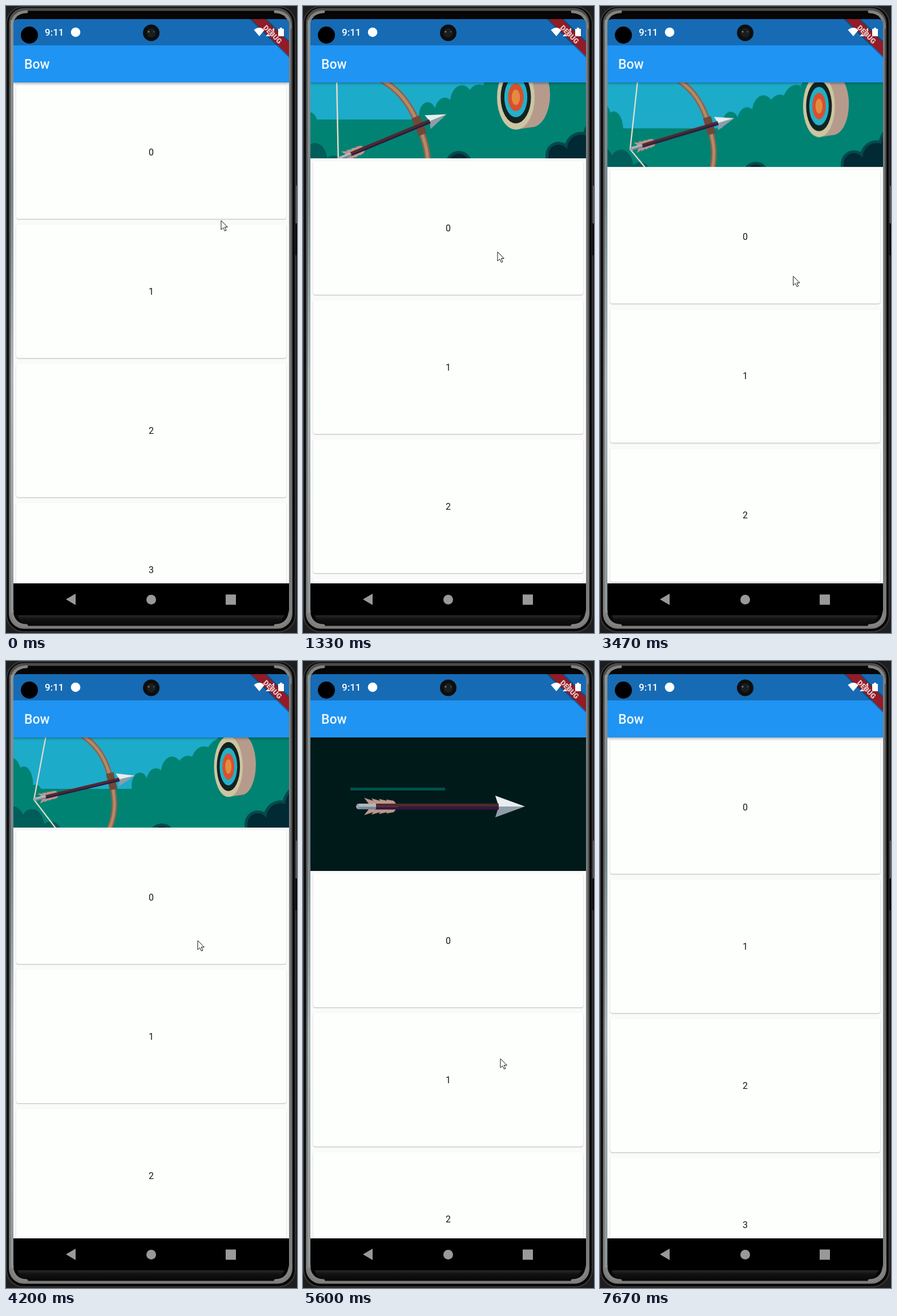
Write an HTML page with a canvas that moves like this. It is 510x1099 px and loops after 7740 ms.

```html
<!DOCTYPE html>
<html lang="en">
<head>
<meta charset="utf-8">
<title>Bow</title>
<style>
html, body { margin: 0; width: 100%; height: 100%; overflow: hidden; background: #1d1d1d; }
body { position: relative; font-family: Roboto, sans-serif; }
svg { position: absolute; left: 0; top: 0; }
#view { position: absolute; left: 13px; top: 134px; width: 483px; height: 878px; overflow: hidden; background: #f9faf9; }
#view > * { position: absolute; left: 0; top: 0; }
#list { width: 483px; height: 980px; background: #f9faf9; }
.card { position: absolute; left: 5px; width: 473px; height: 234px; border-radius: 4px; background: #fdfffd;
  box-shadow: 0 1px 2px rgba(0,0,0,.27); font-size: 16px; line-height: 235px; text-align: center; color: #161616; }
#bar { position: absolute; left: 13px; top: 69px; width: 483px; height: 65px; background: #1f94f3; box-shadow: 0 2px 4px rgba(0,0,0,.3); clip-path: inset(0 0 -8px 0); }
</style>
</head>
<body>
<svg width="510" height="1099">
  <defs>
    <linearGradient id="edge" x2="0" y2="1">
      <stop stop-color="#4c4c4c"/><stop offset=".5" stop-color="#555"/><stop offset="1" stop-color="#7c7c7c"/>
    </linearGradient>
    <linearGradient id="side" x2="0" y2="1">
      <stop stop-color="#8b9294"/><stop offset=".3" stop-color="#77868b"/><stop offset=".6" stop-color="#a9b6ba"/><stop offset="1" stop-color="#8c9395"/>
    </linearGradient>
    <linearGradient id="chin" x2="0" y2="1">
      <stop stop-color="#353535"/><stop offset=".5" stop-color="#111"/><stop offset="1" stop-color="#080808"/>
    </linearGradient>
    <clipPath id="status"><path d="M13 134V31Q13 23 21 23H488Q496 23 496 31V134Z"/></clipPath>
  </defs>
  <rect width="510" height="1099" fill="#1e1e1e"/>
  <rect x="1" y="1" width="506" height="1096" rx="30" fill="#070707" stroke="#383838" stroke-width="2"/>
  <rect x="7.500" y="6" width="492" height="1083" rx="24" fill="#060606" stroke="url(#edge)" stroke-width="5"/>
  <path d="M20 1064H490L480 1082Q478 1086 470 1086H40Q24 1086 20 1064Z" fill="url(#chin)"/>
  <path d="M10 38Q10 11 36 10M498 38Q498 11 472 10M10 1058Q11 1085 36 1086M498 1058Q497 1085 472 1086" fill="none" stroke="#83837f" stroke-width="5" stroke-linecap="round"/>
  <rect x="8" y="24" width="6" height="1040" rx="3" fill="url(#side)"/>
  <rect x="495" y="24" width="4" height="1040" rx="2" fill="#7b7d7e"/>
  <path d="M508 315h2v66h-2z" fill="#555"/>
  <path d="M507 381h3v56h-3z" fill="#080808"/>
  <path d="M13 1000H496V1058Q496 1068 486 1068H23Q13 1068 13 1058Z"/>
</svg>
<div id="view"><canvas id="scene" width="483" height="234"></canvas><div id="list"></div></div>
<div id="bar"></div>
<svg width="510" height="1099">
  <g clip-path="url(#status)">
    <path d="M13 23H496V69H13Z" fill="#166bb4"/>
    <path d="M430 23H454L496 64V88Z" fill="#921b27" stroke="#000" stroke-opacity=".3" stroke-width="4" paint-order="stroke"/>
  </g>
  <text x="32" y="110" font-size="23" font-weight="500" fill="#f1f8fe">Bow</text>
  <text x="68" y="52" font-size="17" font-weight="500" fill="#fff">9:11</text>
  <circle cx="122" cy="46" r="8.300" fill="#fff"/>
  <circle cx="41" cy="51" r="15"/>
  <circle cx="254.500" cy="47" r="14.500" fill="#0c0e0f"/>
  <circle cx="254.500" cy="47" r="8" fill="#1b1e1f"/>
  <circle cx="250" cy="45" r="1.600" fill="#777"/><circle cx="259" cy="45" r="1.200" fill="#555"/>
  <path d="M434.500 42Q444 34 453 42L444 53ZM455 53L470 38V53ZM477 40h3v-2h4v2h3v13h-10z" fill="#fff"/>
  <text transform="translate(467 50) rotate(45)" y="4" font-size="12.500" font-weight="900" text-anchor="middle" fill="#e9cfd0" stroke="#921b27" stroke-width="1.500" paint-order="stroke">DEBUG</text>
  <path d="M105 1040L122 1030V1050ZM385 1031.500h18v18h-18z" fill="#999"/>
  <circle cx="254.500" cy="1040.500" r="8.500" fill="#999"/>
  <path id="cursor" d="M0 0V16L3.700 12.600L6.500 18.300L9 17.200L6.300 11.500H11.300Z" fill="#fff" stroke="#111"/>
</svg>
<script>
const $ = id => document.getElementById(id);
const c = $('scene').getContext('2d');
const LOOP = 7740, FULL = 234, RELEASE = 4950, HIT = 6430;
const SKY = '#1dabca', GREEN = '#008373', TEAL = '#005d59', BAND = '#07494d', NAVY = '#012a34', DARK = '#001a1a', CROW = '#0b1715';

for (let i = 0; i < 4; i++) {
  $('list').innerHTML += `<div class="card" style="top:${5 + 244 * i}px">${i}</div>`;
}

const clamp = x => Math.max(0, Math.min(1, x));
const mix = (a, b, x) => a + (b - a) * x;
const ease = (t, a, b) => { const x = clamp((t - a) / (b - a)); return x * x * (3 - 2 * x); };

// Finger poses: time, pull, cursor x, cursor y
const POSES = [
  [0, 0, 377, 376], [450, 0, 350, 300], [1330, 133, 341, 431], [2200, FULL, 346, 552],
  [2900, FULL, 346, 552], [3600, 140, 338, 466], [4200, 158, 336, 490], [4900, FULL, 346, 697]
];
function poseAt(t) {
  const i = POSES.findLastIndex(p => p[0] <= t), a = POSES[i], b = POSES[i + 1] || a;
  return a.map((v, j) => mix(v, b[j], ease(t, a[0], b[0] + .001)));
}

function at(x, y, turn, scale, draw) {
  c.save();
  c.translate(x, y);
  c.rotate(turn);
  c.scale(scale, scale);
  draw();
  c.restore();
}
const shift = (x, y, draw) => at(x, y, 0, 1, draw);
function box(fill, x, y, w, h) { c.fillStyle = fill; c.fillRect(x, y, w, h); }
function oval(fill, x, y, rx, ry, turn = 0) {
  c.fillStyle = fill;
  c.beginPath();
  c.ellipse(x, y, rx, ry, turn, 0, 7);
  c.fill();
}
function poly(fill, points) {
  c.fillStyle = fill;
  c.beginPath();
  points.forEach(p => c.lineTo(...p));
  c.fill();
}
function meadow(horizon) {
  box(SKY, 13, 134, 483, 234);
  box(GREEN, 13, horizon, 483, 400);
}

// n round lobes from one [x, top, radius] to another, reaching down to the ground
function bush(fill, from, to, n, tall = 1.5, grow = 0) {
  for (let i = 0; i < n; i++) {
    const [x, y, r] = from.map((v, j) => mix(v, to[j], i / (n - 1)));
    const h = r * tall, mid = y + 5 * Math.sin(i * 2.4) + h;
    oval(fill, x, mid, r + grow, h + grow);
    box(fill, x - r - grow, mid, 2 * (r + grow), 400);
  }
}
function darkBush(from, to) {
  bush(BAND, from, to, 3, 1, 5);
  bush(NAVY, from, to, 3, 1);
}
function canopy(x, y) {
  for (let i = 0; i < 4; i++) oval(NAVY, x + 47 * i, y - 4 * i, 20, 38 - 4 * i, .8 - .6 * i);
}

function arrow() {
  for (const s of [-1, 1]) {
    const barbs = [0, 1, 2, 3].flatMap(i => [[7 + 6.5 * i, s * (7.6 - .5 * i)], [15 + 6 * i, s * 5]]);
    poly('#bd968d', [[13, 0], ...barbs, [37, 0]]);
    poly(s < 0 ? '#e8edee' : '#8f9da9', [[122, 9.5 * s], [148, 0], [125, 0]]);
  }
  box('#50292d', 16, -2.5, 109, 2.8);
  box('#32173f', 16, .3, 109, 2.4);
  oval('#98a3ab', 2.5, 0, 2.5, 2.5);
  box('#b3b6b9', 2.5, -2.5, 15, 3);
  box('#70869a', 2.5, .3, 15, 2.2);
}

// Bow around its grip; w = 1 is relaxed, tail = where the string is held
function bow(w, tail) {
  const tx = mix(-64, -66, w), ty = mix(81, 112, w);
  const bx = mix(-15, -8, w), by = mix(62, 72, w);
  const line = (color, width, draw) => {
    c.strokeStyle = color;
    c.lineWidth = width;
    c.beginPath();
    draw();
    c.stroke();
  };
  const limbs = () => {
    c.moveTo(tx + 4, -ty - 3);
    c.lineTo(tx, -ty);
    c.bezierCurveTo(bx, -by, 0, -40, 0, 0);
    c.bezierCurveTo(0, 40, bx, by, tx, ty);
    c.lineTo(tx + 6, ty + 5);
  };
  c.lineCap = 'round';
  line('#8a644e', 8, limbs);
  line('#b48a68', 4, limbs);
  box('#6d4a3a', -5, -12, 11, 24);
  line('#e6dccb', 1.8, () => { c.moveTo(tx, -ty); c.lineTo(tail, 0); c.lineTo(tx, ty); });
}

function target(x, y, rx, ry, depth) {
  const back = y - depth * .15;
  oval('#b69b8c', x + depth, back, rx, ry);
  poly('#b69b8c', [[x, y - ry], [x + depth, back - ry], [x + depth, back + ry], [x, y + ry]]);
  ['#cbc6a2', '#15211f', '#21b1ca', '#d8502f', '#e48b40']
    .forEach((fill, i) => oval(fill, x, y, rx * (1 - .195 * i), ry * (1 - .19 * i)));
}

// Clearing with the bow; k = 0 when fully drawn
function clearing(k, shot) {
  const near = Math.min(1, k), relaxed = 1 - (1 - near) ** 2;
  const tail = shot ? -65 : -118 + 8 * near;
  meadow(300);
  at(490 - 83 * k, 300 - 51 * k, 0, 1 + .17 * k, () =>
    shift(-490 + 83 * k / (1 + .17 * k), -300 + 51 * k / (1 + .17 * k), () => bush(GREEN, [258, 274, 13], [386, 223, 25], 6)));
  shift(-8 * k, 0, () => bush(GREEN, [392, 195, 18], [468, 105, 36], 4));
  shift(-48 * k, 64 * k, () => bush(GREEN, [18, 182, 18], [101, 274, 15], 5, 2));
  shift(-60 * k, 14 * k, () => bush(TEAL, [15, 306, 18], [114, 345, 24], 4));
  target(414 - 41 * near, 261, 14 + 19 * near, 48.5 + 8 * near, 17 + 10 * near);
  shift(40 * relaxed, 6 * relaxed, () => darkBush([408, 338, 18], [488, 296, 32]));
  if (k > .1) oval(BAND, 273, 392 - 14 * near, 23, 23), oval(NAVY, 273, 392 - 14 * near, 18, 18);
  canopy(50, 153);
  at(158 + 45 * k, 252 + 59 * k, -.394 * k, 1 + .39 * k, () => {
    bow(relaxed, tail);
    if (!shot) shift(tail, 0, arrow);
  });
}

function bird(x, y, turn, flap) {
  at(x, y, turn, 1, () => {
    oval(CROW, 0, 0, 6, 11);
    oval(CROW, 0, -10, 4, 5);
    for (let i = -1; i < 2; i++) oval(CROW, 3 * i, 13, 2.5, 7, -.3 * i);
    for (const s of [-1, 1]) {
      c.save();
      c.scale(s, 1);
      c.rotate(flap);
      for (let i = 0; i < 5; i++) oval(CROW, 7 + 6 * i, -4 - 1.5 * i, 9, 3.5, .7 - .25 * i);
      c.restore();
    }
  });
}

function hitScene(t) {
  const s = t - 6670, rise = s * .09, flap = .3 * Math.sin(s / 60);
  meadow(299);
  bush(GREEN, [206, 246, 21], [271, 231, 23], 3);
  bush(GREEN, [313, 187, 20], [480, 138, 34], 5, 1.8);
  canopy(32, 155);
  bird(247, 148 - rise, 0, flap);
  bird(17 - s * .04, 256 - rise, -.45, flap);
  bird(470 + s * .03, 118 - rise, 0, flap);
  target(377, 260, 27.5, 88, 34);
  darkBush([362, 347, 28], [493, 267, 39]);
}

function streaks(t) {
  for (let i = 0; i < 3; i++) {
    const x = (385 + 500 * i - (t - 5600) * 2 + LOOP * 20) % 1600;
    const wrapped = (x - LOOP * 20 % 1600 + 1600) % 1600 - 300;
    box('#005048', wrapped, 222 + 45 * i, 166, 5);
  }
}

function drawScene(t, pull) {
  const u = (FULL - pull) / 101;
  const k = u < 1 ? u ** 1.85 : 1 + (u - 1) * 1.3;
  c.setTransform(1, 0, 0, 1, -13, -134);
  if (t < RELEASE) return clearing(k, false);
  const fly = ease(t, RELEASE, RELEASE + 200), hit = ease(t, HIT - 280, HIT);
  box(DARK, 13, 134, 483, 234);
  if (fly < 1) shift(-560 * fly, 0, () => clearing(0, true));
  else streaks(t);
  if (hit > 0) shift(520 * (1 - hit), 0, () => hitScene(t));
  const wobble = hit * .03 * Math.cos((t - HIT) / 35) * Math.exp(-Math.max(0, t - HIT) / 80);
  at(mix(40, 93, fly), mix(252, 255, fly) - 2 * hit, .034 * hit + wobble, 1 + fly - .07 * hit, arrow);
}

function frame(now) {
  const t = now % LOOP;
  const [, reach, x, y] = poseAt(t);
  const pull = reach * (1 - ease(t, 6980, 7380));
  drawScene(t, pull);
  $('scene').style.transform = `translateY(${pull - FULL}px)`;
  $('list').style.transform = `translateY(${pull}px)`;
  $('cursor').setAttribute('transform', `translate(${x} ${y})`);
  $('cursor').style.display = t < 6100 ? '' : 'none';
  requestAnimationFrame(frame);
}
requestAnimationFrame(frame);
</script>
</body>
</html>
```
